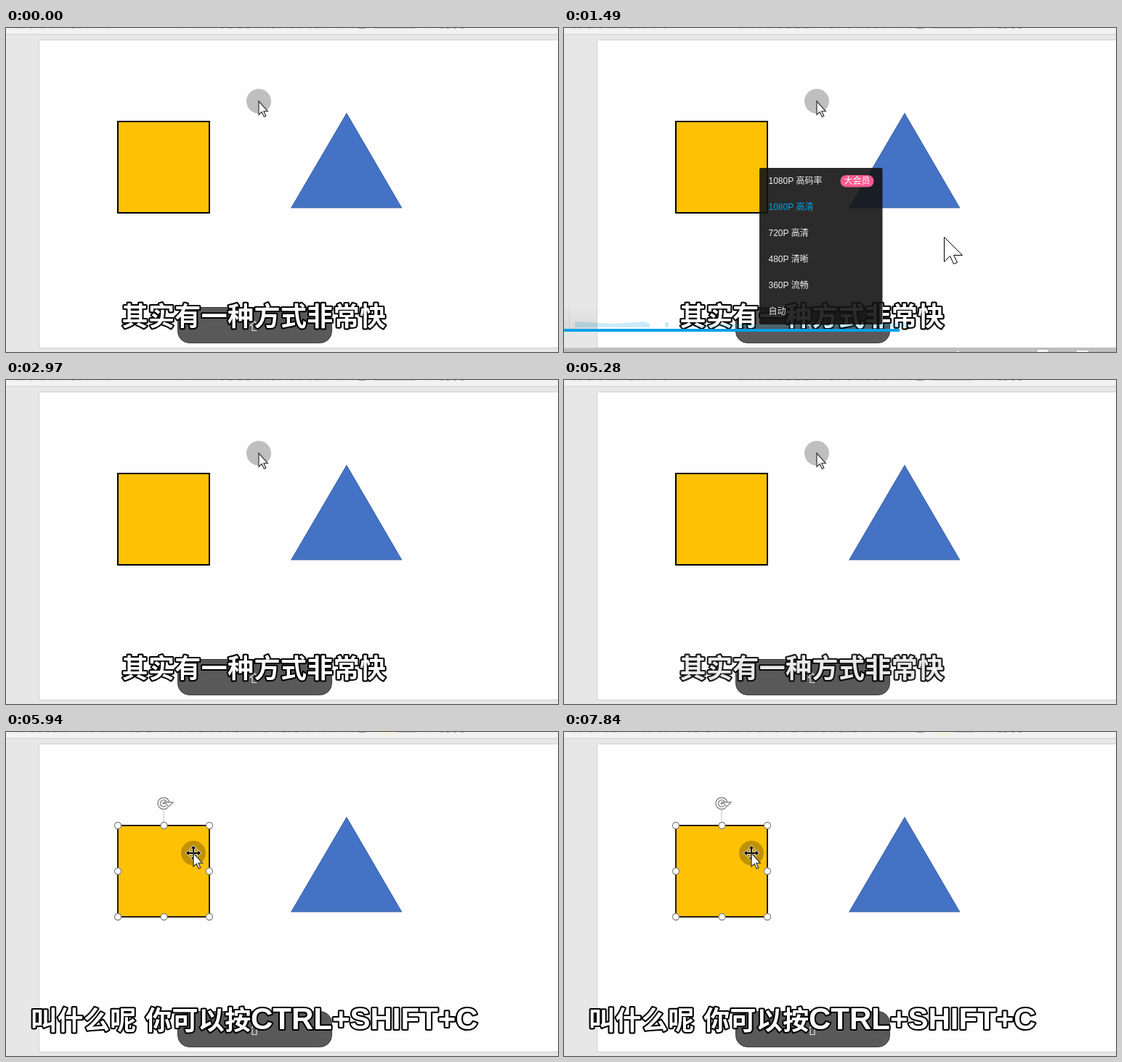
Animation of 760x447 px, one loop 8 s. Source, as an HTML page with a canvas:

```html
<!DOCTYPE html>
<html lang="zh-CN">
<head>
<meta charset="utf-8">
<style>
html, body { margin: 0; width: 100%; height: 100%; overflow: hidden; background: #e7e7e7; }
canvas { display: block; width: 760px; height: 447px; }
</style>
</head>
<body>
<canvas id="stage" width="760" height="447"></canvas>
<script>
const ctx = document.getElementById('stage').getContext('2d');
const LOOP = 8000;
const CJK = '"Noto Sans CJK SC", "Noto Sans CJK", sans-serif';

const ramp = (t, a, b) => Math.min(1, Math.max(0, (t - a) / (b - a)));
const ease = u => u * u * (3 - 2 * u);
const mix = (a, b, u) => a + (b - a) * u;

// Piecewise linear path through [time, x, y] points
function along(points, t) {
  let i = 1;
  while (i < points.length - 1 && t > points[i][0]) i++;
  const [p, q] = [points[i - 1], points[i]];
  const u = ramp(t, p[0], q[0]);
  return [mix(p[1], q[1], u), mix(p[2], q[2], u)];
}

function rect(x, y, w, h, color) {
  ctx.fillStyle = color;
  ctx.fillRect(x, y, w, h);
}

function shape(points, fill, stroke, width, x = 0, y = 0) {
  ctx.beginPath();
  points.forEach(([px, py]) => ctx.lineTo(x + px, y + py));
  ctx.closePath();
  paint(fill, stroke, width);
}

function circle(x, y, r, fill, stroke, width) {
  ctx.beginPath();
  ctx.arc(x, y, r, 0, Math.PI * 2);
  paint(fill, stroke, width);
}

function pill(x, y, w, h, r, fill, stroke, width) {
  ctx.beginPath();
  ctx.roundRect(x, y, w, h, r);
  paint(fill, stroke, width);
}

function paint(fill, stroke, width) {
  if (fill) { ctx.fillStyle = fill; ctx.fill(); }
  if (stroke) { ctx.strokeStyle = stroke; ctx.lineWidth = width; ctx.stroke(); }
}

function faded(alpha, draw) {
  if (alpha <= 0) return;
  ctx.save();
  ctx.globalAlpha = alpha;
  draw();
  ctx.restore();
}

const BIG_ARROW = [[0, 0], [0, 34], [8, 26], [13, 37], [18, 35], [13, 25], [25, 25]];
const SMALL_ARROW = [[0, 0], [0, 18.5], [4.2, 14.8], [7.3, 21.5], [9.8, 20.4], [6.9, 13.9], [12.3, 13.8]];
const UP_KEY = [[0, -7], [5.5, -1], [3, -1], [3, 6], [-3, 6], [-3, -1], [-5.5, -1]];
const MOVE_ARM = [[0, -10], [3.4, -6.2], [0.9, -6.2], [0.9, 0], [-0.9, 0], [-0.9, -6.2], [-3.4, -6.2]];

function ribbon(selected) {
  rect(0, 0, 760, 8, '#f2f2f2');
  rect(0, 8, 760, 2, '#dcdcdc');
  let seed = selected ? 11 : 5;
  const random = () => (seed = (seed * 16807) % 2147483647) / 2147483647;
  for (let i = 0; i < 10; i++) random();
  for (let x = 12; x < 496; x += 7 + random() * 9) {
    if (!selected && x > 146 && x < 240) continue;
    const blue = x > 112 && x < 140;
    rect(x, 0, 2 + random() * 4, 1, blue ? '#c8dcee' : random() < 0.4 ? '#c4c4c4' : '#dedede');
  }
  rect(485, 0, 10, 1, '#a8a8a8');
  if (selected) {
    rect(513, 0, 22, 5, '#f5f1e4');
    rect(538, 0, 27, 1, '#d2cec2');
  } else {
    pill(505, -6, 60, 6.5, 3, '#e0ded9', '#cfccc6', 1);
  }
  rect(575, 0, 14, 1, '#dbe8f2');
  [598, 606, 616, 626].forEach(x => rect(x, 0, 4, 1, '#b0b0b0'));
}

function slide(selected) {
  rect(0, 0, 760, 447, '#e7e7e7');
  ribbon(selected);
  rect(45, 16, 715, 426, '#d0d0d0');
  rect(46, 17, 714, 424, '#fefefe');
  ctx.beginPath();
  ctx.rect(154, 129, 126, 126);
  paint('#ffc103', selected ? '#2a1e00' : '#000', 2);
  shape([[469, 118], [544.5, 248], [393, 248]], '#4472c4', '#3f68ad', 1.2);
}

function selection() {
  rect(216.5, 106, 1, 20, '#c4c4c4');
  ctx.beginPath();
  ctx.arc(217, 98.5, 6.3, 0.75, Math.PI * 2 - 0.15);
  paint(null, '#8c8c8c', 5);
  paint(null, '#fff', 2);
  shape([[218, 97], [230, 97], [224, 103]], '#fff', '#8c8c8c', 1.3);
  circle(217, 98.5, 1.5, '#8c8c8c');
  for (const x of [154, 217.5, 280])
    for (const y of [129, 192, 255])
      if (x !== 217.5 || y !== 192) circle(x, y, 4.5, '#fff', '#858585', 1.3);
}

function recordedPointer(t) {
  const u = ease(ramp(t, 5370, 5600));
  const v = ramp(t, 5640, 5850);
  const x = mix(mix(348, 260.5, u), 258, v);
  const y = mix(mix(101, 165, u), 167, v);
  circle(x, y, 17, 'rgba(0,0,0,.25)');
  if (x < 281 && y > 129) {
    for (const stroke of ['rgba(255,255,255,.85)', null])
      for (let i = 0; i < 4; i++) {
        ctx.save();
        ctx.translate(x, y);
        ctx.rotate(i * Math.PI / 2);
        shape(MOVE_ARM, '#000', stroke, 1.6);
        ctx.restore();
      }
  }
  shape(SMALL_ARROW, '#fff', '#3c3c3c', 1.3, x, y);
}

function keyPill() {
  pill(236.5, 385.5, 212, 49, 16, '#595959', '#3a3a3a', 1);
  shape(UP_KEY, null, '#e4e4e4', 1.2, 342, 411.5);
}

// Each part is [text, font, left, baseline, tracking]
function subtitle(parts, alpha) {
  faded(alpha, () => {
    ctx.lineJoin = 'round';
    ctx.strokeStyle = '#000';
    ctx.fillStyle = '#fff';
    ctx.lineWidth = 4.2;
    for (const method of ['strokeText', 'fillText'])
      for (const [text, font, left, baseline, tracking] of parts) {
        ctx.font = font;
        ctx.letterSpacing = tracking + 'px';
        ctx[method](text, left, baseline);
      }
  });
}

const HAN = `bold 36px ${CJK}`;
const LATIN = 'bold 42px "Liberation Sans", Arial, sans-serif';
const FIRST_LINE = [['其实有一种方式非常快', HAN, 159.5, 411, 0.4]];
const SECOND_LINE = [
  ['叫什么呢', HAN, 34, 411, 0.4],
  ['你可以按', HAN, 192, 411, 0.4],
  ['CTRL+SHIFT+C', LATIN, 337, 410, 0]
];

function subtitles(t) {
  const out = t < 5280 ? 1 : t < 5380 ? 0.9 : 0.9 * (1 - ramp(t, 5380, 5500));
  subtitle(FIRST_LINE, out);
  subtitle(SECOND_LINE, ramp(t, 5470, 5660));
}

function bottomStrip() {
  const shade = ctx.createLinearGradient(0, 425, 0, 447);
  shade.addColorStop(0, 'rgba(0,0,0,0)');
  shade.addColorStop(1, 'rgba(0,0,0,.2)');
  rect(0, 441, 760, 6, shade);
  rect(541, 446, 3, 1, '#fff');
  rect(652, 444, 14, 3, '#f4f4f4');
  rect(706, 445, 16, 2, '#f4f4f4');
}

function progress() {
  const shade = ctx.createLinearGradient(0, 385, 0, 415);
  shade.addColorStop(0, 'rgba(0,0,0,0)');
  shade.addColorStop(1, 'rgba(0,0,0,.06)');
  rect(0, 385, 45, 30, shade);
  rect(7, 385, 1, 30, 'rgba(0,0,0,.08)');
  const heat = 'rgba(0,161,214,.2)';
  shape([[15, 405], [70, 408], [110, 405], [118, 408], [118, 413], [15, 413]], heat);
  rect(139, 406, 5, 7, heat);
  shape([[160, 413], [230, 408], [300, 410], [470, 407], [476, 413]], heat);
  rect(0, 415, 462, 4, '#00a1e6');
}

function qualityMenu() {
  pill(269, 193, 169.5, 216, 2, 'rgba(21,21,21,.9)');
  pill(380.5, 203, 46, 16.5, 8, '#fb5a91');
  ctx.font = `12px "Liberation Sans", ${CJK}`;
  ctx.letterSpacing = '0px';
  const rows = ['1080P 高码率', '1080P 高清', '720P 高清', '480P 清晰', '360P 流畅', '自动'];
  rows.forEach((label, i) => {
    ctx.fillStyle = i === 1 ? '#00a1e6' : '#f0f0f0';
    ctx.fillText(label, 281.5, 215 + 36 * i);
  });
  ctx.fillStyle = '#fff';
  ctx.fillText('大会员', 385.5, 215.3);
}

const POINTER_PATH = [[130, 354, 445], [430, 400, 410], [930, 508, 311], [1230, 522, 289],
  [1430, 523, 288], [1630, 523, 288], [2330, 562, 403]];

function player(t) {
  faded(ramp(t, 130, 430) * (1 - ramp(t, 2660, 2970)), bottomStrip);
  faded(ramp(t, 130, 430) * (1 - ramp(t, 2180, 2460)), progress);
  if (t >= 1430 && t < 1550) qualityMenu();
  if (t >= 130 && t < 2460) {
    const held = Math.floor((t - 30) / 100) * 100 + 30;
    const [x, y] = along(POINTER_PATH, held);
    shape(BIG_ARROW, '#fff', '#000', 1, Math.round(x) + 0.5, Math.round(y) + 0.5);
  }
}

function render(t) {
  const selected = t >= 5900;
  ctx.lineJoin = 'miter';
  slide(selected);
  if (selected) selection();
  recordedPointer(t);
  keyPill();
  subtitles(t);
  ctx.lineJoin = 'miter';
  player(t);
}

const start = performance.now();
function tick() {
  render((performance.now() - start) % LOOP);
  requestAnimationFrame(tick);
}
tick();
</script>
</body>
</html>
```
